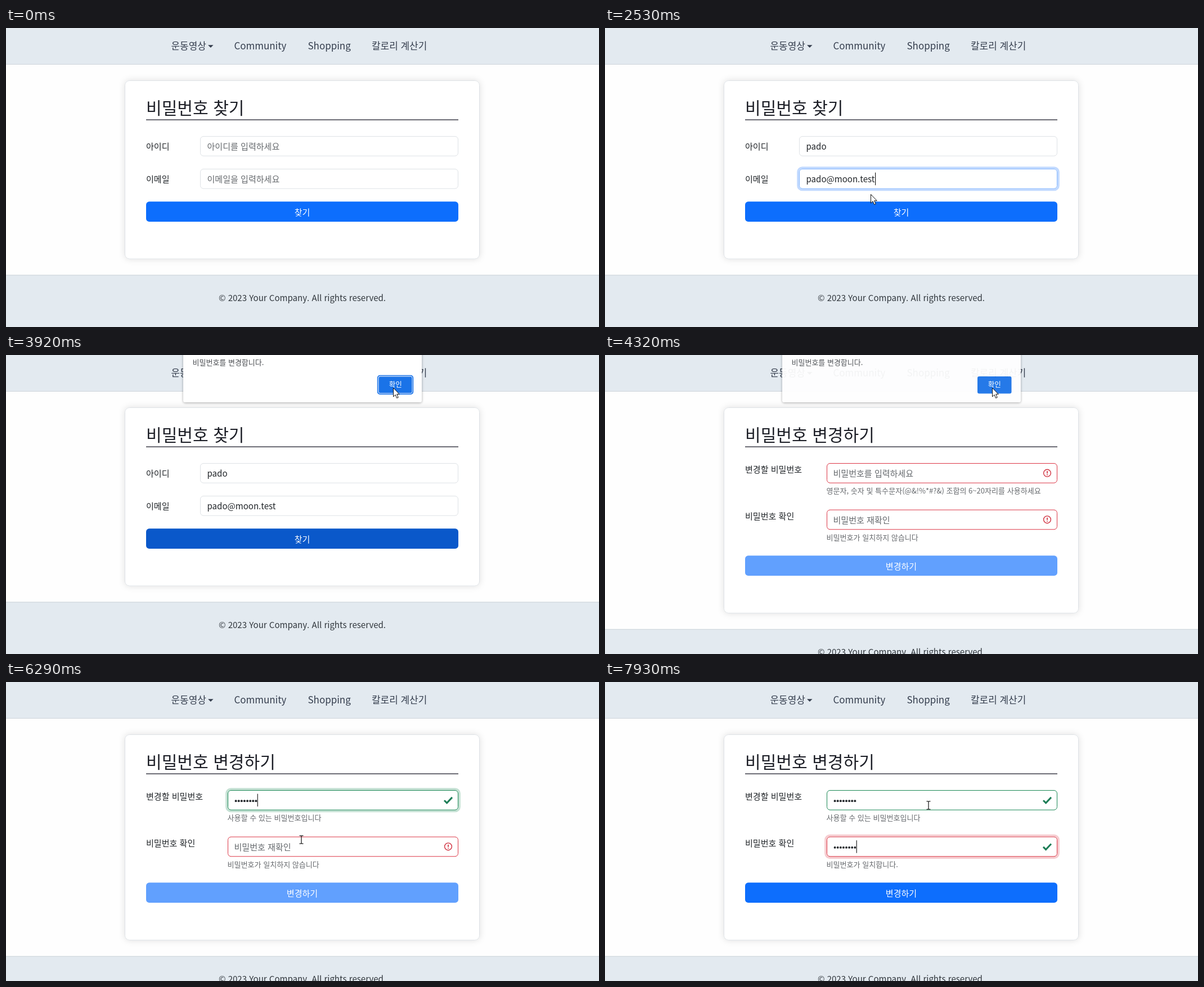
Animation of 1054x531 px, one loop 8 s. Source, as an HTML page:

```html
<!DOCTYPE html>
<html lang="ko">
<head>
<meta charset="utf-8">
<title>비밀번호 찾기</title>
<style>
  html, body { margin: 0; width: 100%; height: 100%; overflow: hidden; background: #fefefe; }
  svg { display: block; width: 1054px; height: 531px; }
  text { font: 15.06px "Noto Sans CJK KR", "Noto Sans KR", "Noto Sans CJK JP", "Noto Sans CJK", sans-serif; fill: #212529; white-space: pre; }
  .nav { font-size: 16.94px; font-weight: 500; fill: #343d4d; }
  .title { font-size: 30.1px; fill: #1d1f27; }
  .hint { font-size: 13.05px; fill: #66696d; }
  .empty { fill: #65696d; }
  .button { font-weight: 500; fill: #fff; text-anchor: middle; }
  .footer { text-anchor: middle; fill: #30363c; }
  .dialog { font-size: 13px; fill: #4a4d51; }
  .ok { font-size: 12.5px; fill: #fff; text-anchor: middle; }
  .offer { font-size: 13.3px; fill: #5f6368; }
  .bar { fill: #e3eaf0; }
  .edge { fill: #cdd4da; }
</style>
</head>
<body>
<svg viewBox="0 0 1054 531">
  <defs>
    <filter id="cardShadow" x="-10%" y="-10%" width="120%" height="120%">
      <feDropShadow dx="0" dy="0" stdDeviation="6" flood-opacity=".12"/>
    </filter>
    <filter id="popShadow" x="-10%" y="-30%" width="120%" height="160%">
      <feDropShadow dx="0" dy="1" stdDeviation="2" flood-opacity=".35"/>
    </filter>
    <g id="arrow" fill="#fff" stroke="#111" stroke-linejoin="round">
      <path d="M.5.5V16l3.6-3.3 2.5 5.8 2.6-1.1-2.5-5.7h4.6z"/>
    </g>
    <g id="beam" fill="none" stroke="#222" stroke-width="1.3">
      <path d="M-3.5-7.2H-1L0-6.2 1-7.2H3.5M0-6.2V6.2M-3.5 7.2H-1L0 6.2 1 7.2H3.5"/>
    </g>
    <g id="hand" fill="#fff" stroke="#111" stroke-linejoin="round">
      <path d="M-1.5 1.5a1.6 1.6 0 0 1 3.2 0V7.5l2-.3.6 1 2-.2.6 1.1 1.8.2q1 .6.8 2.2v4l-1.6 3.2v2H-.4v-1.6L-5.2 13q-.7-2 1-2.2l2.7 2z"/>
      <path d="M1.7 7.5v4M4.3 8.2v3.5M6.9 9.2v2.6" fill="none" stroke-width=".8"/>
    </g>
  </defs>
  <g id="scene"></g>
  <use id="pointer"/>
</svg>
<script>
const LOOP = 8000, FADE = 150;
const GREY = [222, 226, 230], BLUE = [13, 110, 253], SKY = [134, 183, 254],
      NAVY = [10, 88, 202], RED = [220, 53, 69], GREEN = [25, 135, 84];
const USER = 'pado', MAIL = 'pado@moon.test';

// Times in ms
const at = {
  idFocus: 640, idType: 1090, mailFocus: 1630, mailType: 2050, hover: 2890, press: 3010,
  dialog: 3130, okPress: 4040, nextPage: 4250, close: 4310,
  newFocus: 4860, newOffer: 4950, newType: 5680, newValid: 6135,
  againFocus: 6760, againOffer: 6830, againType: 7040, againValid: 7930
};

// Waypoints of the pointer: time, x, y
const path = [
  [70, 941, 477], [640, 501, 216], [2330, 501, 216], [2530, 472, 295], [2670, 471, 303],
  [2860, 471, 303], [2960, 472, 323], [3360, 472, 323], [3850, 688, 58], [4480, 688, 58],
  [4830, 534, 200], [5320, 534, 200], [5480, 425, 214], [5680, 425, 214], [6250, 525, 280],
  [6600, 525, 280], [6740, 532, 294], [7570, 532, 294], [7730, 575, 219], [LOOP, 575, 219]
];

const ramp = (t, from, span = FADE) => Math.min(1, Math.max(0, (t - from) / span));
const lerp = (a, b, p) => a + (b - a) * p;
const rgb = c => `rgb(${c.map(Math.round)})`;
const mix = (a, b, p) => a.map((v, i) => lerp(v, b[i], p));
const typed = (t, start, gap, max) => t < start ? 0 : Math.min(max, 1 + Math.floor((t - start) / gap));
const rect = (x, y, w, h, attrs) => `<rect x="${x}" y="${y}" width="${w}" height="${h}" ${attrs}/>`;
const text = (x, y, cls, s) => `<text x="${x}" y="${y}" class="${cls}">${s}</text>`;
const caret = (x, y) => rect(x, y, 1.2, 22.5, 'fill="#222"');

function frame(title, bottom) {
  return rect(0, 0, 1054, 64, 'class="bar"') + rect(0, 64, 1054, 1, 'class="edge"') +
    text(293.5, 38.4, 'nav', '운동영상') + '<path d="M359 30.2h9.6l-4.8 4.9z" fill="#343d4d"/>' +
    text(405.5, 38.4, 'nav', 'Community') + text(536.5, 38.4, 'nav', 'Shopping') +
    text(650, 38.4, 'nav', '칼로리 계산기') +
    rect(211.5, 93.5, 630, bottom - 93.5, 'rx="8" fill="#fff" stroke="#dee2e6" filter="url(#cardShadow)"') +
    text(249, 153.4, 'title', title) + rect(249, 162.3, 555, 1.5, 'fill="#3c3c48"') +
    rect(0, bottom + 28.5, 1054, 200, 'class="bar"') + rect(0, bottom + 28.5, 1054, 1, 'class="edge"') +
    text(526.5, bottom + 75, 'footer', '© 2023 Your Company. All rights reserved.');
}

function field(x, y, border, ring, focus) {
  const w = 804 - x;
  return rect(x - 1.9, y - 1.9, w + 3.8, 39.3,
      `rx="7.5" fill="none" stroke="${rgb(ring)}" stroke-width="3.8" stroke-opacity="${.25 * focus}"`) +
    rect(x + .5, y + .5, w - 1, 34.7, `rx="5.5" fill="#fff" stroke="${rgb(border)}"`);
}

function button(y, color, label, opacity = 1) {
  return rect(249, y, 555, 35.7, `rx="5.6" fill="${rgb(color)}" opacity="${opacity}"`) +
    text(526.5, y + 24.3, 'button', label);
}

function entry(y, value, count, hint, focus) {
  return field(345, y, mix(GREY, SKY, focus), BLUE, focus) +
    text(357.5, y + 24, count ? '' : 'empty', count ? value.slice(0, count) : hint);
}

function findPage(t) {
  const idFocus = ramp(t, at.idFocus) - ramp(t, at.mailFocus);
  const mailFocus = ramp(t, at.mailFocus) - ramp(t, at.press);
  const idCount = typed(t, at.idType, 100, USER.length);
  const mailCount = typed(t, at.mailType, 34, MAIL.length);
  return frame('비밀번호 찾기', 410) +
    text(249, 215.8, '', '아이디') + text(249, 273.9, '', '이메일') +
    entry(192, USER, idCount, '아이디를 입력하세요', idFocus) +
    entry(250, MAIL, mailCount, '이메일을 입력하세요', mailFocus) +
    (t >= at.idFocus && t < at.mailFocus ? caret(357.5 + 9 * idCount, 198.5) : '') +
    (t >= at.mailFocus && t < at.press ? caret(357.5 + 8.75 * mailCount, 256.7) : '') +
    button(308.3, mix(BLUE, NAVY, ramp(t, at.hover)), '찾기');
}

function statusIcon(y, valid) {
  if (valid) return `<path d="M779 ${y + .6}l4.6 4.6 9.4-10" fill="none" stroke="#1c7d56" stroke-width="3"/>`;
  return `<g fill="none" stroke="#d0303f" stroke-width="1.4"><circle cx="786" cy="${y}" r="6.4"/>` +
    `<path d="M786 ${y - 3.6}v4.4M786 ${y + 2.1}v1.6" stroke-width="1.7"/></g>`;
}

function secret(y, count, hint, focus, focused, valid, t) {
  const color = mix(RED, GREEN, ramp(t, valid));
  let dots = '';
  for (let i = 0; i < count; i++)
    dots += `<circle cx="${408.6 + 5.1 * i}" cy="${y + 19.3}" r="1.95" fill="#212529"/>`;
  return field(394, y, color, color, focus) + (count ? dots : text(405.5, y + 24, 'empty', hint)) +
    (focused ? caret(405.8 + 5.1 * count, y + 6.6) : '') + statusIcon(y + 17.7, t >= valid);
}

function offer(y) {
  return `<g filter="url(#popShadow)" fill="#fff">${rect(486, y, 260, 41, 'rx="2"')}` +
    `<path d="M496 ${y + 1}l9-9 9 9z"/></g><circle cx="505" cy="${y + 20}" r="7.8" fill="#4285f4"/>` +
    text(523.5, y + 24.8, 'offer', 'Nevulo 계정에 저장된 비밀번호 사용');
}

function changePage(t) {
  const moved = t >= at.againFocus, ready = t >= at.againValid;
  const newCount = typed(t, at.newType, 65, 8);
  const againCount = ready ? 8 : t >= 7660 ? 7 : typed(t, at.againType, 70, 6);
  return frame('비밀번호 변경하기', 458.3) +
    text(249, 209.2, '', '변경할 비밀번호') + text(249, 291.9, '', '비밀번호 확인') +
    secret(192, newCount, '비밀번호를 입력하세요', ramp(t, at.newFocus) - ramp(t, at.againFocus),
      t >= at.newFocus && !moved, at.newValid, t) +
    text(393.5, 245.8, 'hint', t < at.newValid
      ? '영문자, 숫자 및 특수문자(@&amp;!%*#?&amp;) 조합의 6~20자리를 사용하세요' : '사용할 수 있는 비밀번호입니다') +
    secret(274.6, againCount, '비밀번호 재확인', ramp(t, at.againFocus), moved, at.againValid, t) +
    text(393.5, 328.6, 'hint', ready ? '비밀번호가 일치합니다.' : '비밀번호가 일치하지 않습니다') +
    button(356.3, BLUE, '변경하기', ready ? 1 : .65) +
    (t >= at.newOffer && t < at.newType ? offer(237) : '') +
    (t >= at.againOffer && t < at.againType ? offer(319.7) : '');
}

function dialog(t) {
  const shown = ramp(t, at.dialog, 125) * (1 - ramp(t, at.close, 190));
  if (!shown) return '';
  const drop = -18 * (1 - ramp(t, at.dialog, 125));
  const ring = t < at.okPress
    ? rect(660.7, 36.7, 62.6, 32.6, 'rx="4" fill="none" stroke="#1a73e8" stroke-width="1.8"') +
      rect(662, 38, 60, 30, 'rx="3" fill="none" stroke="#d6e5fb" stroke-width="1"') : '';
  return `<g opacity="${shown}" transform="translate(0 ${drop})">` +
    rect(315, -60, 424, 144, 'rx="4" fill="#fff" filter="url(#popShadow)"') +
    text(331.5, 18.4, 'dialog', '비밀번호를 변경합니다.') +
    rect(662, 38, 60.5, 30.5, 'rx="3" fill="#1a73e8"') + ring + text(692.3, 57.4, 'ok', '확인') + '</g>';
}

function pointerAt(t) {
  const i = Math.max(1, path.findIndex(p => p[0] > t));
  const [t0, x0, y0] = path[i - 1], [t1, x1, y1] = path[i];
  const p = ramp(t, t0, t1 - t0), ease = p * p * (3 - 2 * p);
  return [lerp(x0, x1, ease), lerp(y0, y1, ease)];
}

function pointerKind(t, x, y) {
  const within = (left, top, h) => x > left && x < 804 && y > top && y < top + h;
  if (t > 3360 && t < at.close) return 'arrow';
  if (t >= at.nextPage) return within(394, 192, 36) || within(394, 274.6, 36) ? 'beam' : 'arrow';
  if (within(249, 308, 36)) return 'hand';
  return within(345, 192, 36) || within(345, 250, 36) ? 'beam' : 'arrow';
}

const scene = document.getElementById('scene');
const pointer = document.getElementById('pointer');

function render(t) {
  scene.innerHTML = (t < at.nextPage ? findPage(t) : changePage(t)) + dialog(t);
  // The mail caret follows the real width of the typed text.
  const [x, y] = pointerAt(t);
  pointer.setAttribute('href', '#' + pointerKind(t, x, y));
  pointer.setAttribute('transform', `translate(${x} ${y})`);
  pointer.setAttribute('visibility', t < path[0][0] ? 'hidden' : 'visible');
}

const start = performance.now();
function tick() {
  render((performance.now() - start) % LOOP);
  requestAnimationFrame(tick);
}
tick();
</script>
</body>
</html>
```
